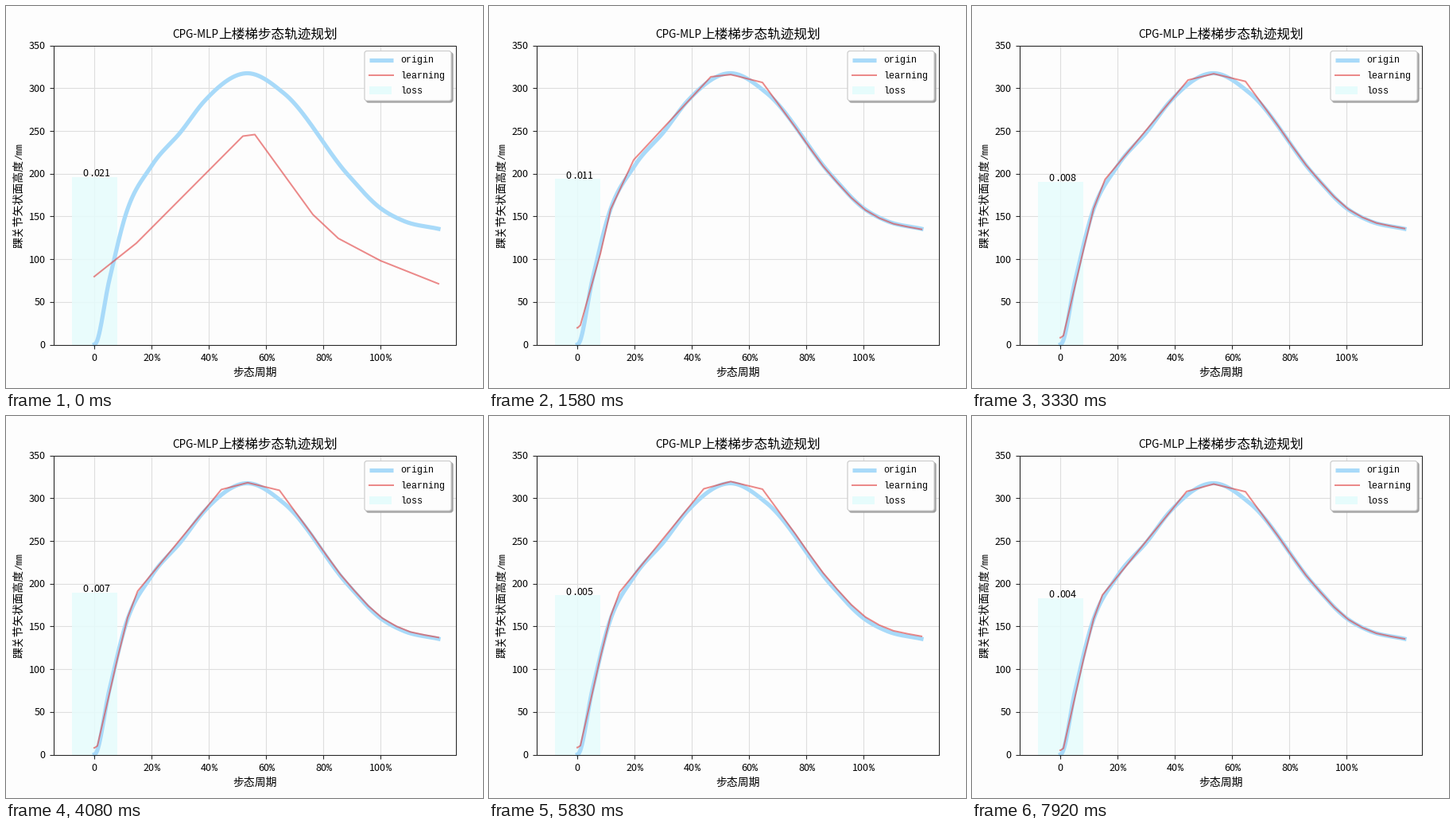
A matplotlib script that plays this animation: 600 px wide and 480 px high, repeating every 8000 ms.

```python
from itertools import groupby

import matplotlib.pyplot as plt
import numpy as np
from matplotlib.animation import FuncAnimation
from matplotlib.patches import FancyBboxPatch, Rectangle

W, H, DPI = 600, 480, 100
FRAMES, LOOP_MS = 96, 8000
LEFT, RIGHT, TOP, BOTTOM = 60, 566, 49.5, 425.5
X0, X_STEP, Y_STEP = 111, 72, (BOTTOM - TOP) / 7
SETTLE = 19  # frames until the learned curve reaches the plan
PAPER, GRID, INK, CYAN = "#fdfdfd", "#dedede", "#282828", "#e6fcfc"
SKY, RED = "#a8daf9", "#e03c3c"

fig = plt.figure(figsize=(W / DPI, H / DPI), dpi=DPI, facecolor=PAPER)
ax = fig.add_axes([0, 0, 1, 1])
ax.set(xlim=(0, W), ylim=(H, 0))
ax.axis("off")


def pt(pixels):
    return pixels * 72 / DPI


def kind(char):
    if ord(char) > 0x2E80:
        return "cjk"
    if char.isdigit():
        return "digit"
    return "caps" if char.isupper() or char == "-" else "mono"


# font, scale of the base size, advance in em
STYLES = {
    "cjk": ("Noto Sans CJK JP", 1, 1),
    "digit": ("Noto Sans CJK JP", 0.9, 0.5),
    "caps": ("Noto Sans CJK JP", 0.815, 0.5),
    "mono": ("Liberation Mono", 0.8333, 0.5),
}


def label(x, y, string, size=10, align=0.5, vertical=False):
    """Set a line with half-width Latin and full-width CJK characters."""
    em = size * DPI / 72
    runs = [(k, "".join(g)) for k, g in groupby(string, kind)]
    offset = -align * sum(len(s) * STYLES[k][2] for k, s in runs) * em
    texts = []
    for k, s in runs:
        font, scale, advance = STYLES[k]
        px, py = (x, y - offset) if vertical else (x + offset, y)
        texts.append(ax.text(px, py, s, family=font, size=size * scale, color="black",
                             va="baseline", ha="left", rotation=90 * vertical,
                             rotation_mode="anchor", zorder=8))
        offset += len(s) * advance * em
    return texts


def line(xs, ys, color, width, zorder, **kw):
    return ax.plot(xs, ys, color=color, lw=pt(width), zorder=zorder, **kw)[0]


def smooth(points, n=400):
    """Cubic Hermite curve y(x) through a few points, level at its start."""
    px, py = np.array(points, float).T
    slope = np.gradient(py, px)
    slope[0] = 0
    x = np.linspace(px[0], px[-1], n)
    i = np.clip(np.searchsorted(px, x) - 1, 0, len(px) - 2)
    h = px[i + 1] - px[i]
    u = (x - px[i]) / h
    y = ((1 + 2 * u) * (1 - u) ** 2 * py[i] + u * (1 - u) ** 2 * h * slope[i]
         + u * u * (3 - 2 * u) * py[i + 1] + u * u * (u - 1) * h * slope[i + 1])
    return x, y


# axes, grid and tick labels
for k in range(8):
    y = BOTTOM - k * Y_STEP
    if 0 < k < 7:
        line([LEFT, RIGHT], [y, y], GRID, 1.1, 1)
    line([LEFT - 5, LEFT], [y, y], INK, 1.1, 6, solid_capstyle="butt")
    label(49.5, y + 4.7, str(50 * k), align=1)
for k in range(6):
    x = X0 + k * X_STEP
    line([x, x], [TOP, BOTTOM], GRID, 1.1, 1)
    line([x, x], [BOTTOM, BOTTOM + 5], INK, 1.1, 6, solid_capstyle="butt")
    label(x + 0.3, 446, f"{20 * k}%" if k else "0")
ax.add_patch(Rectangle((LEFT, TOP), RIGHT - LEFT, BOTTOM - TOP, fill=False,
                       ec=INK, lw=pt(1.1), zorder=6))
label(313, 40.3, "CPG-MLP上楼梯步态轨迹规划", 12)
label(312.7, 465.3, "步态周期")
label(20, 237.7, "踝关节矢状面高度/mm", vertical=True)

# legend
for shift, face, edge, z in ((2, "#a0a0a0", "#a0a0a0", 6.5), (0, PAPER, "#cccccc", 7)):
    ax.add_patch(FancyBboxPatch((451 + shift, 56.5 + shift), 109, 62.5,
                                boxstyle="round,pad=0,rounding_size=3",
                                fc=face, ec=edge, lw=pt(1.2), zorder=z))
line([456.5, 486.5], [67.5, 67.5], SKY, 5.2, 7.5, solid_capstyle="butt")
line([456.5, 486.5], [86.5, 86.5], RED, 2, 7.5, alpha=0.6)
ax.add_patch(Rectangle((457, 101), 28, 9.5, fc=CYAN, lw=0, zorder=7.5))
for name, y in (("origin", 71.5), ("learning", 90.7), ("loss", 110)):
    label(496.3, y, name, align=0)

# planned trajectory and the first guess of the network
PLAN = smooth([(111.5, 425), (130, 344), (150, 264), (183, 201), (220, 158), (250, 119),
               (303, 84.5), (350, 110), (430, 212), (471, 254), (500, 270), (544, 280)])
GUESS = np.array([(111, 340), (164, 298), (298, 163.5), (313, 161.5),
                  (386, 262), (418, 292), (471, 320), (544, 349)]).T
line(*PLAN, SKY, 5.2, 3)


def fitted(slow):
    """Straight pieces near the plan; `slow` (1 to 0) is the part still to learn."""
    knee, left_peak = 164 + 18 * slow, 270 + 9 * slow
    knots = [(111.5, -5 - 15 * slow), (115, -2 - 16 * slow), (140, 5 + 5 * slow), (153, 0),
             (knee, -5 - 5 * slow), (left_peak, -5), (304, 1), (344, -10)]
    x, gap = np.array(knots + [(fall, 0) for fall in np.linspace(385, 544, 10)]).T
    return x, np.interp(x, *PLAN) + gap


def loss(step):
    return 0.01 - 6.8e-5 * step + 0.0111 * np.exp(-step / 10.5)


learned = line([], [], RED, 2, 4, alpha=0.6, solid_joinstyle="round")
bar = ax.add_patch(Rectangle((82.7, TOP), 57.6, 1, fc=CYAN, alpha=0.85, lw=0, zorder=2))
loss_text = label(114.2, 0, "0.021")


def update(frame):
    early = (1 - min(frame / SETTLE, 1)) ** 1.6
    late = max(frame - SETTLE, 0)
    x, y = fitted(np.exp(-late / 12))
    u = max(late - 12, 0) / 64
    y = y - 4 * np.sin(2 * np.pi * u * u)  # overshoot that swings ever faster
    grid = np.union1d(x, GUESS[0])
    learned.set_data(grid, early * np.interp(grid, *GUESS) + (1 - early) * np.interp(grid, x, y))

    top = 214.7 + 14.5 * frame / (FRAMES - 1)
    bar.set_y(top)
    bar.set_height(BOTTOM - top)
    for text in loss_text:
        text.set_y(top - 0.7)
    loss_text[-1].set_text(f"{loss(frame):.3f}"[2:])
    return [learned, bar, *loss_text]


anim = FuncAnimation(fig, update, frames=FRAMES, interval=LOOP_MS / FRAMES,
                     repeat=True, repeat_delay=0, blit=False)
plt.show()
```
